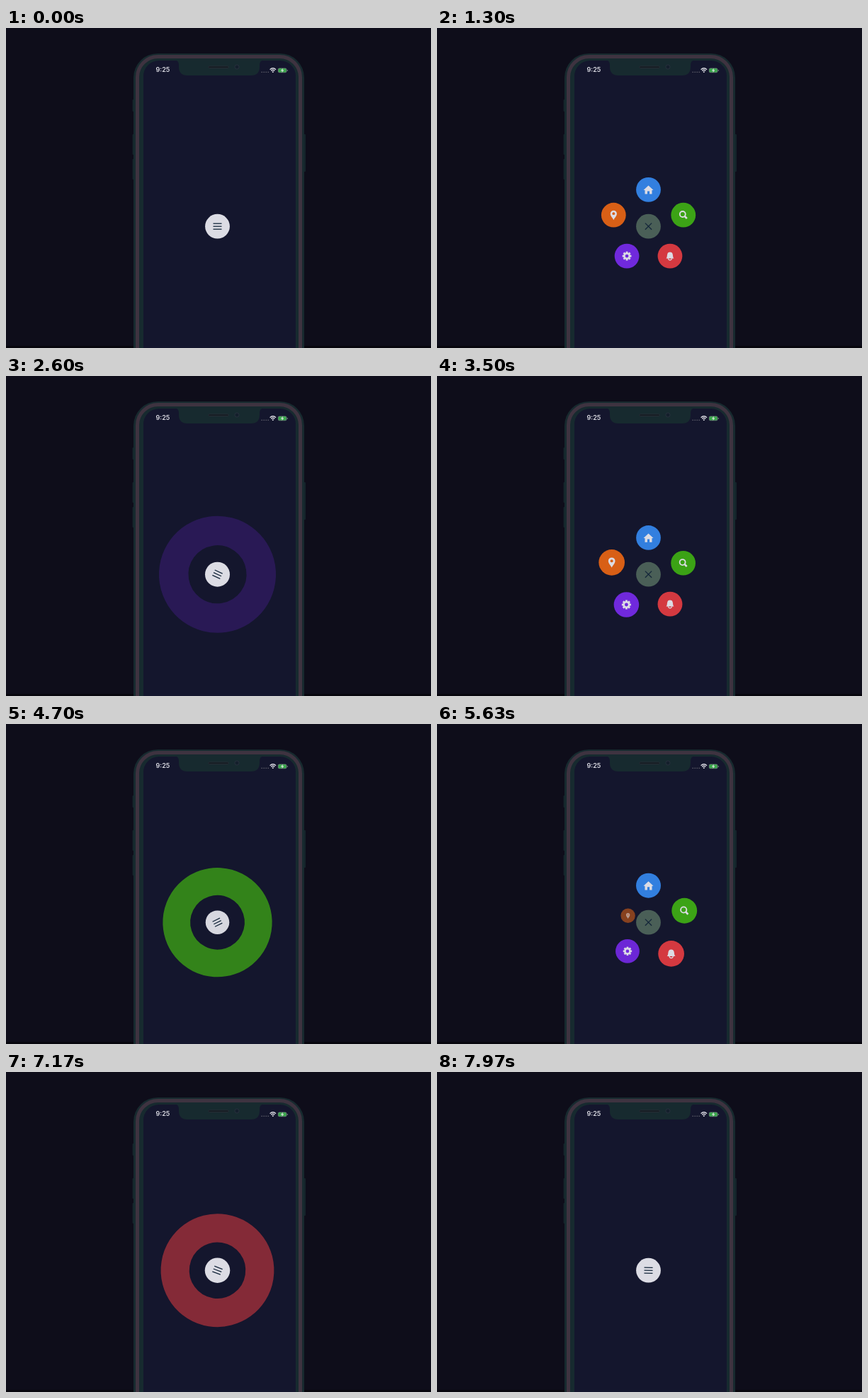
Recreate the animation shown at these times as an HTML page with a canvas. Size 600 by 452 pixels, loop 8000 ms.

```html
<!DOCTYPE html>
<html lang="en">
<head>
<meta charset="utf-8">
<title>Circle menu</title>
<style>
  html, body { margin: 0; width: 600px; height: 452px; overflow: hidden; background: #0e0d1a; }
  svg, canvas { position: absolute; left: 0; top: 0; }
</style>
</head>
<body>
<svg width="600" height="452">
  <rect y="449" width="600" height="3" fill="#07060d"/>
  <g fill="#14232a">
    <rect x="178.5" y="101" width="3" height="17" rx="1"/>
    <rect x="178.5" y="150" width="3" height="29" rx="1"/>
    <rect x="178.5" y="185" width="3" height="29" rx="1"/>
    <rect x="420" y="150" width="3" height="53" rx="1"/>
  </g>
  <rect x="180" y="36" width="241" height="480" rx="34" fill="#172a2f"/>
  <rect x="185.5" y="40.5" width="230" height="480" rx="29" fill="none" stroke="#3e3340" stroke-width="5"/>
  <rect x="194" y="46" width="215" height="480" rx="22" fill="#14162d"/>
  <path d="M238 45Q244 46 244 52V55Q244 67 256 67H346Q358 67 358 55V52Q358 46 364 45Z" fill="#172a2f"/>
  <rect x="286" y="54" width="28" height="2.5" rx="1.2" fill="#101a20" stroke="#33313b" stroke-width=".7"/>
  <circle cx="326" cy="55" r="3" fill="#14202c" stroke="#2c3340" stroke-width=".8"/>
  <text x="211.5" y="62.3" font-family="Inter, Roboto, sans-serif" font-size="9" font-weight="600" fill="#dcdce4">9:25</text>
  <path d="M360.5 62.3H371" stroke="#62636f" stroke-width="1.3" stroke-dasharray="1.4 1.6"/>
  <g fill="none" stroke="#dcdce4" stroke-width="1.4">
    <path d="M372.6 58.7Q376.8 54.9 381 58.7"/>
    <path d="M374.3 60.5Q376.8 58.2 379.3 60.5"/>
  </g>
  <circle cx="376.8" cy="62" r="1.1" fill="#dcdce4"/>
  <rect x="384.3" y="57" width="11.6" height="5.8" rx="1.6" fill="#38a84a" stroke="#7a8a86" stroke-width=".7"/>
  <rect x="396.7" y="59" width="1" height="2" fill="#7a8a86"/>
  <path d="M391 56.8L387.8 60.4H390L389.3 63L392.5 59.4H390.4Z" fill="#e4e6e8"/>
</svg>
<canvas id="menu" width="600" height="452"></canvas>
<script>
const ctx = document.getElementById('menu').getContext('2d');
const LOOP = 8000, CX = 298.5, CY = 280.2, DIST = 51.8, R = 17.4, TAU = Math.PI * 2;
const LIGHT = [220, 220, 228], DIM = [74, 95, 87], INK = '#14263a';
const FILL = 0.5, REVEAL = 0.535, STAGGER = 0.075;

// Start time in ms; a tap names the chosen item.
const actions = [
  { at: 440 }, { at: 1640, item: 3 },
  { at: 2940 }, { at: 3965, item: 1 },
  { at: 5240 }, { at: 6341, item: 2 }
];

const clamp = x => Math.min(1, Math.max(0, x));
const mix = (a, b, k) => a + (b - a) * k;

// Cubic bezier (x1, 0, x2, 1), solved by bisection.
const ease = (x1, x2) => p => {
  p = clamp(p);
  let lo = 0, hi = 1, t = 0.5;
  for (let i = 0; i < 24; i++) {
    t = (lo + hi) / 2;
    const x = 3 * (1 - t) * (1 - t) * t * x1 + 3 * (1 - t) * t * t * x2 + t * t * t;
    if (x < p) lo = t; else hi = t;
  }
  return 3 * (1 - t) * t * t + t * t * t;
};
const easeIn = ease(0.42, 1), easeOut = ease(0, 0.58), easeInOut = ease(0.42, 0.58);

// Damped spring from 0 to 1.
const spring = (t, decay, freq) => t <= 0 ? 0 :
  1 - Math.exp(-decay * t) * (Math.cos(freq * t) + decay / freq * Math.sin(freq * t));

function disc(x, y, r, color) {
  ctx.fillStyle = color;
  ctx.beginPath();
  ctx.arc(x, y, Math.max(0, r), 0, TAU);
  ctx.fill();
}

function line(width, ...points) {
  ctx.lineWidth = width;
  ctx.beginPath();
  points.forEach(([x, y]) => ctx.lineTo(x, y));
  ctx.stroke();
}

const homePath = new Path2D('M-7 .6L0 -6L7 .6H5V6.2H1.6V2H-1.6V6.2H-5V.6Z');
const pinPath = new Path2D('M0 7C-1.2 4-4.6 1.5-4.6-2A4.6 4.6 0 0 1 4.6-2C4.6 1.5 1.2 4 0 7Z');
const bellPath = new Path2D('M-5.5 3.4C-3.8 2-4.4-1-3.6-3.2C-2.6-6.3 2.6-6.3 3.6-3.2C4.4-1 3.8 2 5.5 3.4Z');

const items = [
  { color: '#327fdf', icon() { ctx.fill(homePath); } },
  { color: '#3ca316', icon() {
    ctx.lineWidth = 1.8;
    ctx.beginPath();
    ctx.arc(-1, -1.2, 4, 0, TAU);
    ctx.stroke();
    line(2.6, [2.2, 2], [5, 5]);
  } },
  { color: '#d43940', icon() {
    ctx.fill(bellPath);
    ctx.lineWidth = 1.2;
    ctx.beginPath();
    ctx.arc(0, 3.2, 2.6, 0, Math.PI);
    ctx.stroke();
  } },
  { color: '#7029dc', icon(color) {
    for (let i = 0; i < 4; i++) {
      ctx.rotate(Math.PI / 4);
      ctx.fillRect(-1.4, -6.4, 2.8, 12.8);
    }
    disc(0, 0, 4.9, ctx.fillStyle);
    disc(0, 0, 2.4, color);
  } },
  { color: '#d85f16', icon(color) {
    ctx.fill(pinPath);
    disc(0, -2, 1.9, color);
  } }
];
const angleOf = i => -Math.PI / 2 + i * TAU / items.length;

function drawItem(i, distance, scale, turn = 0) {
  const { color, icon } = items[i], a = angleOf(i) + turn;
  ctx.save();
  ctx.translate(CX + distance * Math.cos(a), CY + distance * Math.sin(a));
  ctx.scale(scale, scale);
  ctx.rotate(turn);
  disc(0, 0, R, color);
  ctx.fillStyle = ctx.strokeStyle = '#dcdce4';
  icon(color);
  ctx.restore();
}

function drawGlyph(paint, angle, scale, alpha) {
  if (alpha <= 0) return;
  ctx.save();
  ctx.globalAlpha = alpha;
  ctx.rotate(angle);
  ctx.scale(scale, scale);
  ctx.strokeStyle = INK;
  paint();
  ctx.restore();
}
const bars = () => [-4, 0, 4].forEach(y => line(1.3, [-6, y], [6, y]));
const cross = () => {
  line(1.3, [-4.6, -4.6], [4.6, 4.6]);
  line(1.3, [4.6, -4.6], [-4.6, 4.6]);
};

function drawCenter(scale, dim, paintGlyphs) {
  ctx.save();
  ctx.translate(CX, CY);
  ctx.scale(scale, scale);
  disc(0, 0, R, `rgb(${LIGHT.map((c, i) => Math.round(mix(c, DIM[i], dim)))})`);
  paintGlyphs();
  ctx.restore();
}

function drawOpening(t) {
  items.forEach((_, i) => {
    const own = t - i * STAGGER, k = spring(own, 12, 13);
    if (own <= 0) return;
    ctx.globalAlpha = clamp(k);
    drawItem(i, DIST * k, k);
    ctx.globalAlpha = 1;
  });
  const k = easeInOut(t / 0.3);
  const bounce = 1 - 0.1 * Math.exp(-13.8 * t) * Math.cos(44 * t);
  drawCenter(bounce, k, () => {
    drawGlyph(bars, Math.PI * k, mix(1, 0.2, k), 1 - k);
    drawGlyph(cross, Math.PI * (k - 1), mix(0.2, 1, k), k);
  });
}

function drawRing(item, t) {
  const sweep = easeIn(t / FILL) * TAU, out = (t - REVEAL) / 0.5;
  if (out >= 1) return;
  const scale = 1 + 0.2 * easeOut(out), start = angleOf(item);
  ctx.save();
  ctx.globalAlpha = 1 - easeIn(out);
  ctx.translate(CX, CY);
  ctx.scale(scale, scale);
  ctx.strokeStyle = items[item].color;
  ctx.lineWidth = R * 2;
  ctx.lineCap = 'round';
  ctx.beginPath();
  ctx.arc(0, 0, DIST, start, start + sweep);
  ctx.stroke();
  ctx.restore();
}

function drawChoice(item, t) {
  const filling = t < FILL;
  if (filling) items.forEach((_, i) => i !== item && drawItem(i, DIST, 1));
  drawRing(item, t);
  if (filling) drawItem(item, DIST, 1, easeIn(t / FILL) * TAU);

  const shown = t - REVEAL;
  if (shown < 0) {
    const scale = 1 - easeInOut(t / 0.32);
    if (scale > 0.001) drawCenter(scale, 1, () => drawGlyph(cross, 0, 1, 1));
  } else {
    const k = spring(shown, 13.2, 10.6);
    const tilt = Math.PI * (spring(shown, 5, 8.66) - 1);
    drawCenter(k, 1 - clamp(k), () => drawGlyph(bars, tilt, 1, 1));
  }
}

function draw(ms) {
  ctx.clearRect(0, 0, 600, 452);
  const action = actions.filter(a => a.at <= ms).pop();
  if (!action) return drawCenter(1, 0, () => drawGlyph(bars, 0, 1, 1));
  const t = (ms - action.at) / 1000;
  if (action.item === undefined) drawOpening(t);
  else drawChoice(action.item, t);
}

const begin = performance.now();
function tick() {
  draw((performance.now() - begin) % LOOP);
  requestAnimationFrame(tick);
}
tick();
</script>
</body>
</html>
```
